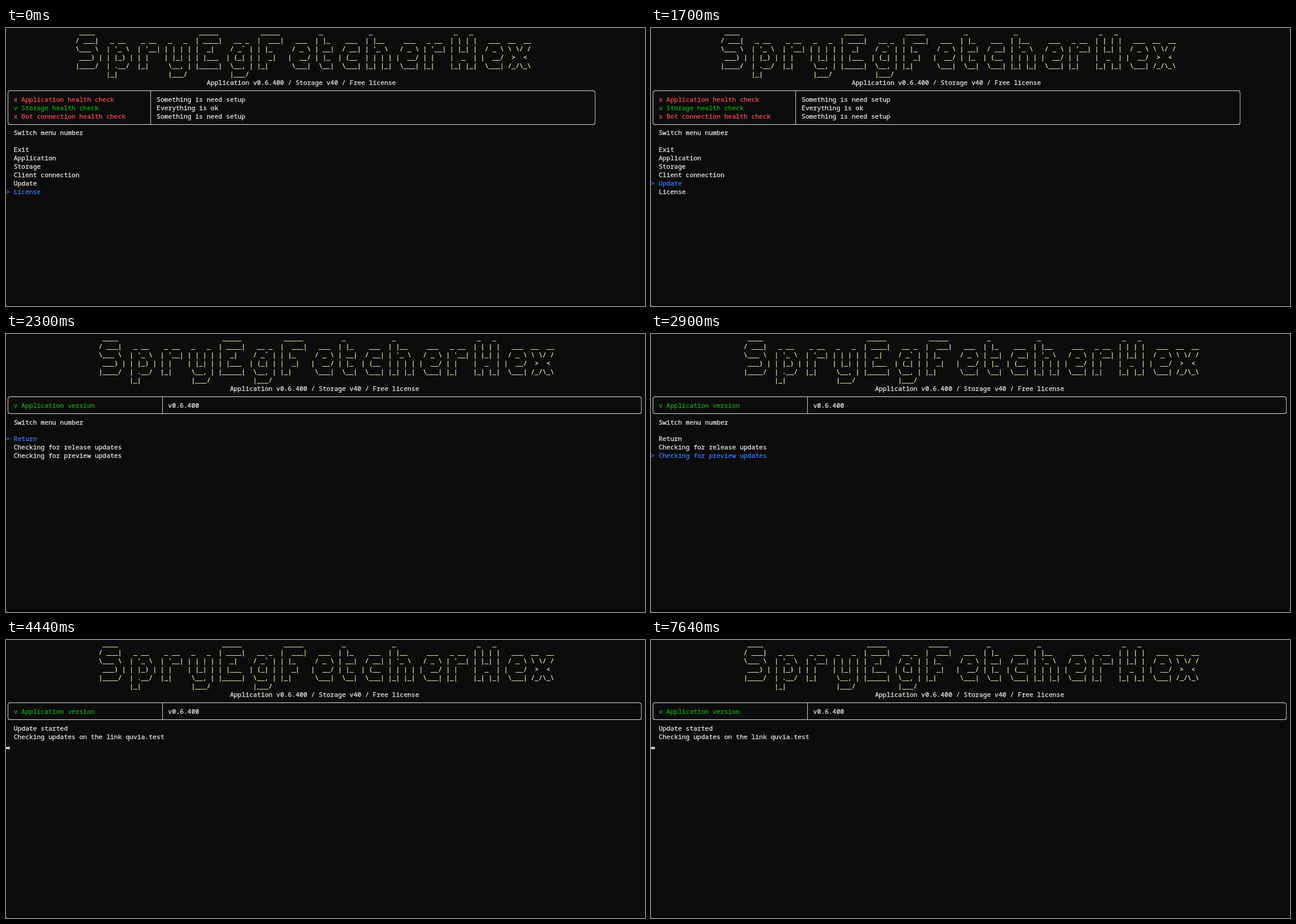
These frames come from a looping animation (1133 by 494 pixels, 8 s). An HTML page:

```html
<!DOCTYPE html>
<html lang="en">
<head>
<meta charset="utf-8">
<title>Terminal</title>
<style>
  html, body { margin: 0; width: 100%; height: 100%; overflow: hidden; background: #040405; }
  svg { display: block; width: 100%; height: 100%; }
  text {
    font: 11.413px "Noto Sans Mono", "DejaVu Sans Mono", monospace;
    font-variant-ligatures: none;
    stroke-width: 0.3;
    white-space: pre;
  }
</style>
</head>
<body>
<svg viewBox="0 0 1133 494">
  <rect y="-10" width="1133" height="501" rx="5" fill="#0c0c0c"/>
  <path d="M0 491Q0.5 493.5 3 494H0Z" fill="#777"/>
  <g id="screen"></g>
  <path id="pointer" d="M0 0V16.5L3.8 12.9L6.4 18.8L8.8 17.7L6.3 12H11.6Z" fill="#fff" stroke="#000" stroke-width="0.8"/>
</svg>
<script>
const LOOP = 8000, COL = 6.848, ROW = 14.92;
const WHITE = "#e4e4e4", YELLOW = "#f9f1a5", RED = "#f04a58", GREEN = "#13a80e", BLUE = "#3b78ff";

const glyphs = {
  S: [" ____  ", "/ ___| ", "\\___ \\ ", " ___) |", "|____/ "],
  p: ["       ", " _ __  ", "| '_ \\ ", "| |_) |", "| .__/ ", "|_|    "],
  r: ["      ", " _ __ ", "| '__|", "| |   ", "|_|   "],
  y: ["       ", " _   _ ", "| | | |", "| |_| |", " \\__, |", " |___/ "],
  E: [" _____ ", "| ____|", "|  _|  ", "| |___ ", "|_____|"],
  g: ["       ", "  __ _ ", " / _` |", "| (_| |", " \\__, |", " |___/ "],
  F: [" _____ ", "|  ___|", "| |_   ", "|  _|  ", "|_|    "],
  e: ["      ", "  ___ ", " / _ \\", "|  __/", " \\___|"],
  t: [" _   ", "| |_ ", "| __|", "| |_ ", " \\__|"],
  c: ["      ", "  ___ ", " / __|", "| (__ ", " \\___|"],
  h: [" _     ", "| |__  ", "| '_ \\ ", "| | | |", "|_| |_|"],
  H: [" _   _ ", "| | | |", "| |_| |", "|  _  |", "|_| |_|"],
  x: ["      ", "__  __", "\\ \\/ /", " >  < ", "/_/\\_\\"]
};
const banner = [0, 1, 2, 3, 4, 5].map(row =>
  [..."SpryEgFetcherHex"].map(ch => glyphs[ch][row] ?? " ".repeat(glyphs[ch][0].length)).join(" "));

const screen = document.getElementById("screen");
const pointer = document.getElementById("pointer");

function add(tag, attrs, content = "") {
  const el = document.createElementNS("http://www.w3.org/2000/svg", tag);
  for (const key in attrs) el.setAttribute(key, attrs[key]);
  el.textContent = content;
  screen.append(el);
}

function print(col, row, content, fill = WHITE) {
  add("text", { x: col * COL, y: row * ROW + 11.4, fill, stroke: fill }, content);
}

function header(col) {
  banner.forEach((line, row) => print(col, row, line, YELLOW));
  print(col + 34, 6, "Application v0.6.400 / Storage v40 / Free license");
}

// Centre of a cell, snapped so that thin lines stay sharp.
const mid = (index, size) => Math.floor((index + 0.5) * size) + 0.5;

function table(divider, last, items) {
  const left = mid(0, COL), right = mid(last, COL);
  const top = mid(7, ROW), bottom = mid(8 + items.length, ROW);
  const line = (d, stroke) => add("path", { d, stroke, fill: "none", "stroke-width": 1.1 });
  const side = (x, stroke) => line(`M${x} ${top + 4}V${bottom - 4}`, stroke);
  const edge = (y, dir) =>
    line(`M${left} ${y + 4 * dir}Q${left} ${y} ${left + 4} ${y}H${right - 4}Q${right} ${y} ${right} ${y + 4 * dir}`, WHITE);
  edge(top, 1);
  edge(bottom, -1);
  side(left, "#d6c4b8");
  side(right, "#a9afe0");
  line(`M${mid(divider, COL)} ${top}V${bottom}`, "#b0cede");
  items.forEach(([label, value, fill], i) => {
    print(2, 8 + i, label, fill);
    print(divider + 2, 8 + i, value);
  });
}

function menu(row, items, selected) {
  print(2, row, "Switch menu number");
  items.forEach((item, i) => {
    const active = i === selected;
    if (active) print(0, row + 2 + i, ">", BLUE);
    print(2, row + 2 + i, item, active ? BLUE : WHITE);
  });
}

function caret(row) {
  add("rect", { x: 0, y: Math.round(row * ROW + 11), width: 7, height: 4, fill: "#cccccc" });
}

function mainScreen(selected) {
  header(18);
  table(37, 152, [
    ["x Application health check", "Something is need setup", RED],
    ["v Storage health check", "Everything is ok", GREEN],
    ["x Bot connection health check", "Something is need setup", RED]
  ]);
  if (selected !== undefined)
    menu(12, ["Exit", "Application", "Storage", "Client connection", "Update", "License"], selected);
}

function updateScreen(selected) {
  header(24);
  table(40, 164, [["v Application version", "v0.6.400", GREEN]]);
  if (selected !== undefined)
    menu(10, ["Return", "Checking for release updates", "Checking for preview updates"], selected);
}

function progress(linkShown, caretOn) {
  updateScreen();
  print(2, 10, "Update started");
  if (linkShown) print(2, 11, "Checking updates on the link quvia.test");
  if (caretOn) caret(linkShown ? 12 : 11);
}

const steps = [
  [0, () => mainScreen(5)],
  [1700, () => mainScreen(4)],
  [2240, () => mainScreen()],
  [2300, () => updateScreen(0)],
  [2770, () => updateScreen(1)],
  [2900, () => updateScreen(2)],
  [3440, () => progress(false, true)],
  [3700, () => progress(true, true)]
];
// The caret blinks while the update check is running.
[3900, 4440, 4970, 5500, 6040, 6570, 7100, 7640].forEach((time, i) =>
  steps.push([time, () => progress(true, i % 2 === 1)]));

let shown = -1;

function render(t) {
  const current = steps.findLastIndex(([time]) => time <= t);
  if (current !== shown) {
    shown = current;
    screen.replaceChildren();
    steps[current][1]();
  }
  const y = t < 570 ? 18 : t < 640 ? 22 : 26;
  pointer.setAttribute("transform", `translate(993 ${y})`);
  pointer.setAttribute("visibility", t >= 500 && t < 840 ? "visible" : "hidden");
}

const start = performance.now();
function tick() {
  render((performance.now() - start) % LOOP);
  requestAnimationFrame(tick);
}
tick();
</script>
</body>
</html>
```
